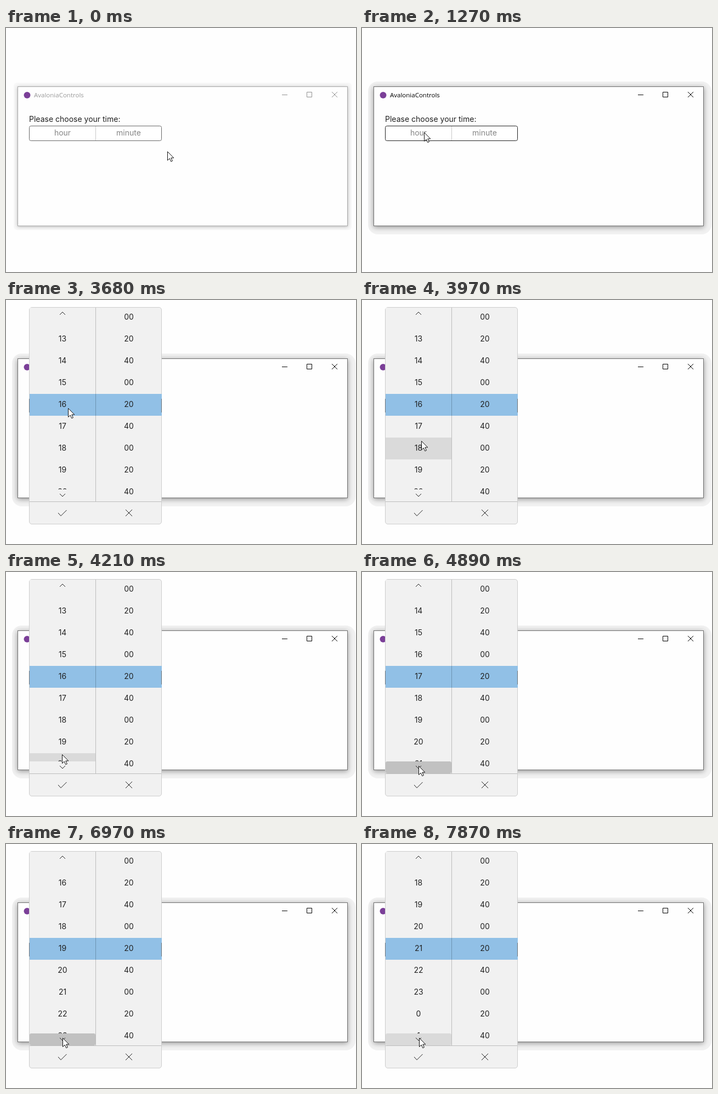
Animation of 638 by 447 pixels, one loop 8 s. Source, as an HTML page:

```html
<!DOCTYPE html>
<html lang="en">
<meta charset="utf-8">
<title>Time picker</title>
<style>
  html, body { margin: 0; width: 638px; height: 447px; overflow: hidden; background: #fefefe; }
  svg { display: block; }
  text { font: 14px Inter, sans-serif; fill: #202020; }
  .mid { text-anchor: middle; }
  .hint { fill: #858585; }
  .line { fill: none; stroke: #222; }
  #halo { fill: #f8f8f8; }
  #frame { fill: #fefefe; stroke: #a8a8a8; filter: drop-shadow(0 1px 3px #0004); }
  #title { font: 11.5px "Open Sans", "Noto Sans", sans-serif; fill: #999; }
  #caption { fill: none; stroke: #909090; }
  .active #halo { fill: #f1f1f1; }
  .active #frame { stroke: #707070; filter: drop-shadow(0 2px 5px #0006); }
  .active #title { fill: #000; }
  .active #caption { stroke: #000; }
</style>
<svg id="stage" width="638" height="447" viewBox="0 0 638 447">
  <clipPath id="list"><rect x="43" y="14" width="241" height="355"/></clipPath>

  <rect id="halo"/>
  <rect id="frame" x="21.5" y="107.5" width="601" height="255"/>
  <circle cx="38.5" cy="123" r="6" fill="#7b3f98"/>
  <text id="title" x="51" y="127">AvaloniaControls</text>
  <path id="caption" d="M503 122.5h10M548.5 117.5h9v9h-9zM594 117l10 10m0-10l-10 10"/>
  <text x="42" y="172">Please choose your time:</text>
  <rect id="field" x="42.5" y="179.5" width="241" height="27" rx="3" fill="#fff"/>
  <path d="M163.5 180v26" stroke="#c8c8c8"/>
  <text class="mid hint" x="103" y="197">hour</text>
  <text class="mid hint" x="223.500" y="197">minute</text>

  <g id="popup">
    <rect x="42.5" y="13.5" width="241" height="397" rx="4.500" fill="#f1f1f1" stroke="#cdcdcd"/>
    <rect x="43" y="172" width="241" height="40" fill="#91c0e6"/>
    <path d="M42.5 181v25M283.5 181v25" stroke="#6d7378"/>
    <g clip-path="url(#list)">
      <rect id="rowHover" x="43" width="120" height="40" fill="#dadada"/>
      <g id="rows"></g>
    </g>
    <rect x="43" y="14" width="120" height="22" fill="#f1f1f1"/>
    <rect x="43" y="347" width="120" height="22" fill="#f1f1f1"/>
    <rect id="down" x="43" y="347" width="120" height="22" rx="3"/>
    <path d="M43 369.5h240M163.5 14v355" stroke="#bdbdbd"/>
    <path d="M163.5 172v40" stroke="#6c93b2"/>
    <path class="line" d="M98 27l5-5 5 5M98 355l5 5 5-5M95 390l5 5.500 10.500-10.500M218 384l12 12m0-12l-12 12"/>
  </g>

  <path id="cursor" d="M.5.5v16l3.700-3.500 2.600 5.700 2.600-1.200-2.600-5.500h5z" fill="#fff" stroke="#111"/>
</svg>
<script>
const $ = id => document.getElementById(id);
const LOOP = 8000, ACTIVATE = 1270, OPEN = 1560;

// Pointer tip: time, x, y
const path = [
  [260, 294, 226], [320, 291, 229], [440, 255, 232], [620, 170, 212], [800, 113, 191],
  [2600, 113, 191], [2660, 113, 189], [3620, 113, 189], [3680, 113, 198],
  [3920, 108, 258], [4190, 101, 343], [4380, 102, 354], [4580, 102, 354],
  [4760, 103, 355], [7640, 103, 355], [7800, 104, 355]
];

// Each click on the down button: pressed, value changes, released
const clicks = [
  [4830, 4890, 5010], [5570, 5630, 5690], [6300, 6360, 6420],
  [6970, 7030, 7150], [7630, 7690, 7810]
];

const label = (x, y) => `<text class="mid" x="${x}" y="${y}"></text>`;
$('rows').innerHTML = Array.from({ length: 9 }, (_, i) =>
  label(103, 36 + 40 * i) + label(224, 36 + 40 * i)).join('');
const cells = [...$('rows').children];
cells.forEach((cell, i) => {
  if (i % 2) cell.textContent = String((i - 1) / 2 % 3 * 20).padStart(2, '0');
});

function set(id, attrs) {
  for (const name in attrs) $(id).setAttribute(name, attrs[name]);
}

// The pointer is sampled about every 60 ms
function pointer(time) {
  const t = Math.floor((time - 20) / 60) * 60 + 20;
  const next = path.findIndex(p => p[0] > t);
  if (next === 0) return path[0].slice(1);
  if (next < 0) return path.at(-1).slice(1);
  const a = path[next - 1], b = path[next], k = (t - a[0]) / (b[0] - a[0]);
  return [1, 2].map(i => Math.round(a[i] + (b[i] - a[i]) * k));
}

function draw(t) {
  const [x, y] = pointer(t);
  const active = t >= ACTIVATE, open = t >= OPEN;
  const overField = x > 42 && x < 284 && y > 179 && y < 207;
  const onButton = y >= 347;
  const pressed = clicks.some(([from, , to]) => t >= from && t < to - 60);
  const hour = 16 + clicks.filter(c => t >= c[1]).length;

  $('stage').classList.toggle('active', active);
  set('halo', active
    ? { x: 11, y: 98, width: 626, height: 280, rx: 18 }
    : { x: 14, y: 100, width: 616, height: 270, rx: 6 });
  set('field', { stroke: overField ? '#222' : '#686868' });
  set('popup', { visibility: open ? 'visible' : 'hidden' });
  set('rowHover', { y: 212 + 40 * Math.floor((y - 212) / 40), opacity: y >= 212 && !onButton ? 1 : 0 });
  set('down', { fill: pressed ? '#c1c1c1' : '#dadada', opacity: onButton ? 1 : 0 });
  set('cursor', { transform: `translate(${x} ${y})` });
  for (let i = 0; i < 9; i++) cells[2 * i].textContent = (hour - 4 + i) % 24;
}

const start = performance.now();
function tick() {
  draw((performance.now() - start) % LOOP);
  requestAnimationFrame(tick);
}
tick();
</script>
</html>
```
